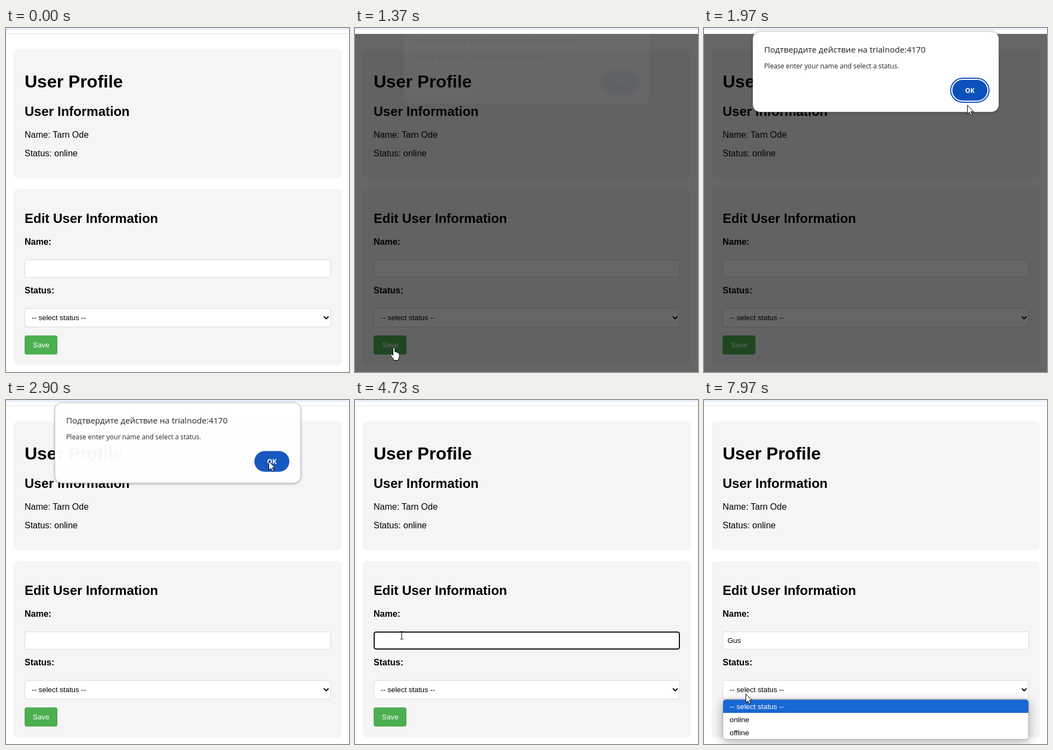
Recreate the animation shown at these times as an HTML page. Size 627x630 px, loop 8 s.

```html
<!DOCTYPE html>
<html lang="en">
<head>
<meta charset="utf-8">
<title>User Profile</title>
<style>
  html, body { margin: 0; width: 100%; height: 100%; overflow: hidden; background: #fff; }
  svg { display: block; width: 627px; height: 630px; }
  text { font: 13.333px "Liberation Sans", Arial, sans-serif; white-space: pre; }
  .h1 { font-size: 32px; font-weight: 700; }
  .h2 { font-size: 24px; font-weight: 700; }
  .p { font-size: 16px; }
  .label { font-size: 16px; font-weight: 700; }
  .card { fill: #f5f5f5; }
  .field { fill: #fff; stroke: #d9d9d9; }
  .white { fill: #fff; }
  .line { fill: none; stroke: #000; }
  .pointer { fill: #fff; stroke: #000; stroke-linejoin: round; }
  #dialog text { font-family: "Open Sans", "Noto Sans", sans-serif; font-size: 12.2px; fill: #1f1f1f; }
  #dialog .title { font-size: 15.1px; font-weight: 500; }
  #dialog .ok { font-size: 12px; font-weight: 700; fill: #fff; }
  #panel { filter: drop-shadow(0 1px 2px rgba(0, 0, 0, .35)); }
  #list { filter: drop-shadow(0 4px 9px rgba(0, 0, 0, .32)); }
</style>
</head>
<body>
<svg viewBox="0 0 627 630">
  <rect width="627" height="630" fill="#fff"/>
  <rect width="627" height="4" fill="#e9f0fb"/>
  <rect y="10" width="627" height="1" fill="#dcdfe3"/>

  <rect class="card" x="14" y="39" width="600" height="236" rx="8"/>
  <text class="h1" x="34" y="109">User Profile</text>
  <text class="h2" x="34" y="161">User Information</text>
  <text class="p" x="34" y="201">Name: Tarn Ode</text>
  <text class="p" x="34" y="235">Status: online</text>

  <rect class="card" x="14" y="295" width="600" height="323" rx="8"/>
  <text class="h2" x="34" y="357">Edit User Information</text>
  <text class="label" x="34" y="397">Name:</text>
  <rect class="field" x="34.5" y="424.5" width="559" height="32" rx="3.5"/>
  <rect id="focus" class="line" x="35" y="425" width="558" height="31" rx="3.5" stroke-width="2" style="stroke:#101010"/>
  <text id="value" x="43" y="445"></text>
  <rect id="caret" y="433" width="1" height="15"/>
  <g id="handles">
    <g id="handle">
      <ellipse cy="425.5" rx="8" ry="5.3" fill="#d45cf5" opacity=".85"/>
      <path d="M-6 426.5Q0 423.5 6 426.5L0 432Z" fill="#b400f0"/>
    </g>
    <use href="#handle" transform="matrix(1 0 0 -1 0 880.5)"/>
  </g>

  <text class="label" x="34" y="486">Status:</text>
  <rect class="field" x="34.5" y="513.5" width="559" height="34" rx="3.5"/>
  <text x="47" y="535">-- select status --</text>
  <path class="line" d="M581 528.3l4.3 4.2 4.3-4.2" stroke-width="2"/>
  <rect id="save" x="34" y="563" width="60" height="35" rx="4"/>
  <text class="white" x="49" y="585">Save</text>

  <rect id="shade" y="11" width="627" height="619" opacity=".6"/>

  <g id="dialog">
    <rect id="panel" class="white" x="89.5" y="6.5" width="449" height="147" rx="13" stroke="#c9c9c9"/>
    <text class="title" x="110" y="45">Подтвердите действие на trialnode:4170</text>
    <text x="110" y="74">Please enter your name and select a status.</text>
    <rect id="ring" x="451" y="92" width="70" height="44" rx="22" fill="none" stroke="#0b50bc" stroke-width="2"/>
    <rect id="ok" x="454" y="95" width="64" height="38" rx="19"/>
    <text class="ok" x="486" y="118.5" text-anchor="middle">OK</text>
  </g>

  <g id="popup">
    <rect id="list" class="white" x="34.5" y="548.5" width="559" height="73" rx="5" stroke="#a9a9a9"/>
    <path d="M35 573V554q0-5 5-5H588q5 0 5 5V573Z" fill="#1967d2"/>
    <text class="white" x="47" y="566">-- select status --</text>
    <text x="47" y="590">online</text>
    <text x="47" y="614">offline</text>
  </g>

  <g id="cursor">
    <path id="arrow" class="pointer" d="M.5.5V16.5L4.2 13 6.8 18.6 9.3 17.5 6.8 12H11.7Z"/>
    <path id="hand" class="pointer" d="M-1.5 2a1.7 1.7 0 0 1 3.4 0V8q2.4-1 2.9 1 2.3-.8 2.8 1.2 2.4-.4 2.6 1.8V16q0 3-1.8 5v2.5H-.5V21.5L-5 15.5q-1.3-2.5.5-3.2 1.3-.2 3 2.2Z"/>
    <path id="ibeam" class="line" d="M-3-7h2q1 0 1 1V6q0 1-1 1h-2M3-7h-2q-1 0-1 1M0 6q0 1 1 1h2"/>
  </g>
</svg>
<script>
const LOOP = 8000;
const $ = id => document.getElementById(id);
const show = (id, on) => $(id).style.display = on ? '' : 'none';
const within = (t, a, b) => t >= a && t < b;
const span = (t, a, b) => t <= a ? 0 : t >= b ? 1 : (t - a) / (b - a);
const mix = (a, b, k) => a + (b - a) * k;
const smooth = k => k * k * (3 - 2 * k);
const last = (table, t) => table.findLastIndex(row => row[0] <= t);

// time, x, y, pointer shape from that time on
const path = [
  [0, 359, 438, ''],
  [230, 359, 438, 'arrow'],
  [400, 190, 545, 'arrow'],
  [500, 40, 607, 'arrow'],
  [570, 58, 592, 'hand'],
  [670, 71, 585, 'hand'],
  [1500, 71, 585, 'arrow'],
  [1970, 481, 141, 'arrow'],
  [2170, 480, 112, 'arrow'],
  [2900, 480, 112, 'arrow'],
  [3270, 400, 640, ''],
  [3570, 300, 625, 'arrow'],
  [3900, 120, 400, 'arrow'],
  [4010, 98, 425, 'ibeam'],
  [4200, 85, 432, 'ibeam'],
  [4370, 85, 431, 'ibeam'],
  [7200, 85, 431, 'ibeam'],
  [7260, 99, 460, 'arrow'],
  [7390, 64, 566, 'arrow'],
  [7500, 76, 547, 'arrow'],
  [7700, 76, 547, 'arrow'],
  [7730, 76, 538, 'arrow'],
  [LOOP, 76, 538, '']
];
const typed = [[0, ''], [5970, 'G'], [6300, 'Gu'], [6670, 'Gus']];
const caretOn = [[4200, 4730], [5270, 5800], [5970, 7200], [7700, 7870]];

function drawCursor(t) {
  const i = last(path, t);
  const [t0, x0, y0, kind] = path[i];
  const [t1, x1, y1] = path[i + 1];
  const k = smooth(span(t, t0, t1));
  const x = Math.round(mix(x0, x1, k)), y = Math.round(mix(y0, y1, k));
  const half = kind === 'ibeam' ? .5 : 0;
  $('cursor').setAttribute('transform', `translate(${x + half} ${y})`);
  for (const id of ['arrow', 'hand', 'ibeam']) show(id, id === kind);
}

function drawField(t) {
  const value = $('value');
  const text = typed[last(typed, t)][1];
  if (value.textContent !== text) value.textContent = text;
  const end = 43 + Math.round(text ? value.getComputedTextLength() : 0);
  $('caret').setAttribute('x', end);
  $('handles').setAttribute('transform', `translate(${end + .5} 0)`);
  show('caret', caretOn.some(([a, b]) => within(t, a, b)));
  show('handles', within(t, 6000, 7870));
  show('focus', within(t, 4200, 7870));
}

function drawDialog(t) {
  const enter = 1 - (1 - span(t, 1360, 1610)) ** 2;
  const leave = span(t, 2830, 3060);
  const y = -16 * (1 - enter) - 16 * leave ** 2;
  $('dialog').setAttribute('transform', `translate(0 ${y})`);
  $('dialog').style.opacity = span(t, 1365, 1560) * (1 - leave ** 3);
  show('dialog', within(t, 1370, 3060));
  show('shade', within(t, 1370, 2830));
  show('ring', t < 2830);
  const hover = span(t, 2200, 2370);
  $('ok').setAttribute('fill', `rgb(${mix(11, 16, hover)} ${mix(80, 84, hover)} ${mix(188, 190, hover)})`);
}

function draw(t) {
  drawField(t);
  drawDialog(t);
  drawCursor(t);
  $('save').setAttribute('fill', within(t, 570, 1370) ? '#45a049' : '#4caf50');
  show('popup', t >= 7870);
  $('popup').style.opacity = span(t, 7850, 7960);
}

const start = performance.now();
function tick() {
  draw((performance.now() - start) % LOOP);
  requestAnimationFrame(tick);
}
tick();
</script>
</body>
</html>
```
